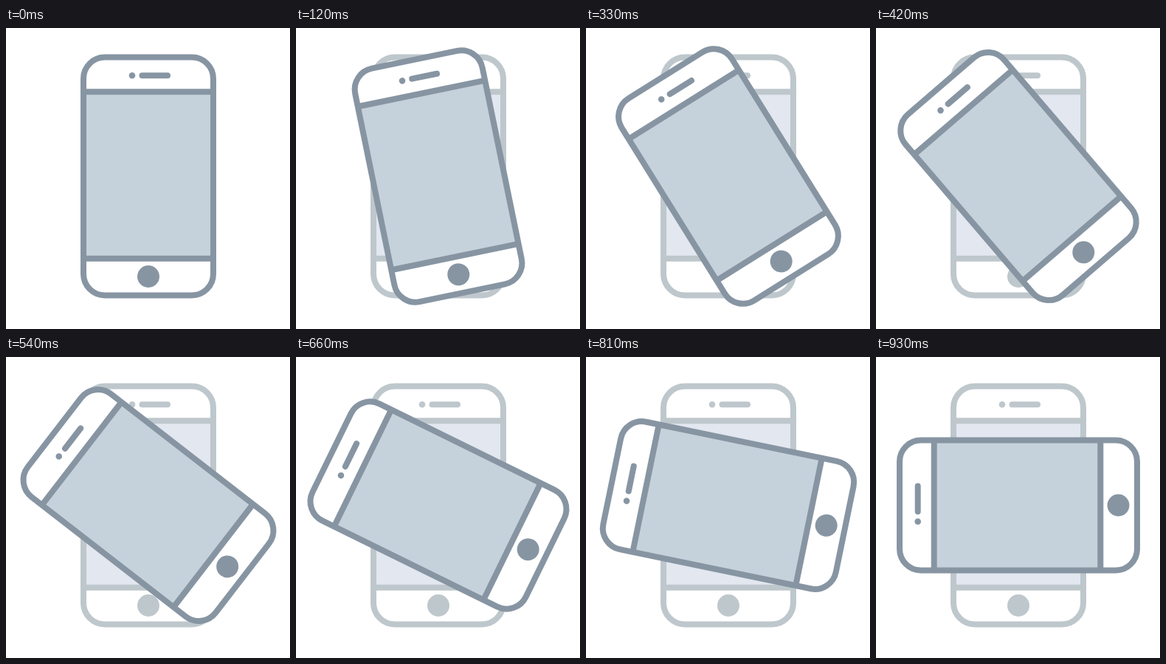
An HTML page with a canvas that plays this animation: 385 px wide and 407 px high, repeating every 1800 ms.

```html
<!DOCTYPE html>
<html lang="en">
<head>
<meta charset="utf-8">
<title>Rotate phone</title>
<style>
  html, body { margin: 0; width: 100%; height: 100%; overflow: hidden; background: #fff; }
  canvas { display: block; }
</style>
</head>
<body>
<canvas id="stage" width="385" height="407"></canvas>
<script>
const LOOP = 1800, STEP = 30, TURN_STEPS = 31;
const CENTER = { x: 193, y: 200.5 };
const SOLID = { line: '#8795a3', screen: '#c5d2db' };
const FADED = { line: '#bec7cc', screen: '#e2e7f0' };
const ctx = document.getElementById('stage').getContext('2d');

function line(x1, y1, x2, y2) {
  ctx.beginPath();
  ctx.moveTo(x1, y1);
  ctx.lineTo(x2, y2);
  ctx.stroke();
}

function dot(x, y, r) {
  ctx.beginPath();
  ctx.arc(x, y, r, 0, Math.PI * 2);
  ctx.fill();
}

function drawPhone(colors, angle) {
  ctx.save();
  ctx.translate(CENTER.x, CENTER.y);
  ctx.rotate(angle);

  ctx.lineWidth = 8;
  ctx.strokeStyle = colors.line;
  ctx.beginPath();
  ctx.roundRect(-88, -161, 176, 322, 29);
  ctx.fillStyle = '#fff';
  ctx.fill();
  ctx.fillStyle = colors.screen;
  ctx.fillRect(-86, -114, 172, 225);
  ctx.stroke();

  ctx.lineCap = 'butt';
  line(-88, -114.3, 88, -114.3);
  line(-88, 111.3, 88, 111.3);
  ctx.lineCap = 'round';
  line(-8.5, -136.3, 26, -136.3);

  ctx.fillStyle = colors.line;
  dot(-22, -136.3, 4.3);
  dot(0, 135.5, 15);
  ctx.restore();
}

function draw(ms) {
  const step = Math.min(Math.floor((ms % LOOP) / STEP + 0.001), TURN_STEPS);
  ctx.fillStyle = '#fff';
  ctx.fillRect(0, 0, 385, 407);
  if (step > 0) drawPhone(FADED, 0);
  drawPhone(SOLID, -Math.PI / 2 * step / TURN_STEPS);
}

const start = performance.now();
function tick() {
  draw(performance.now() - start);
  requestAnimationFrame(tick);
}
tick();
</script>
</body>
</html>
```
